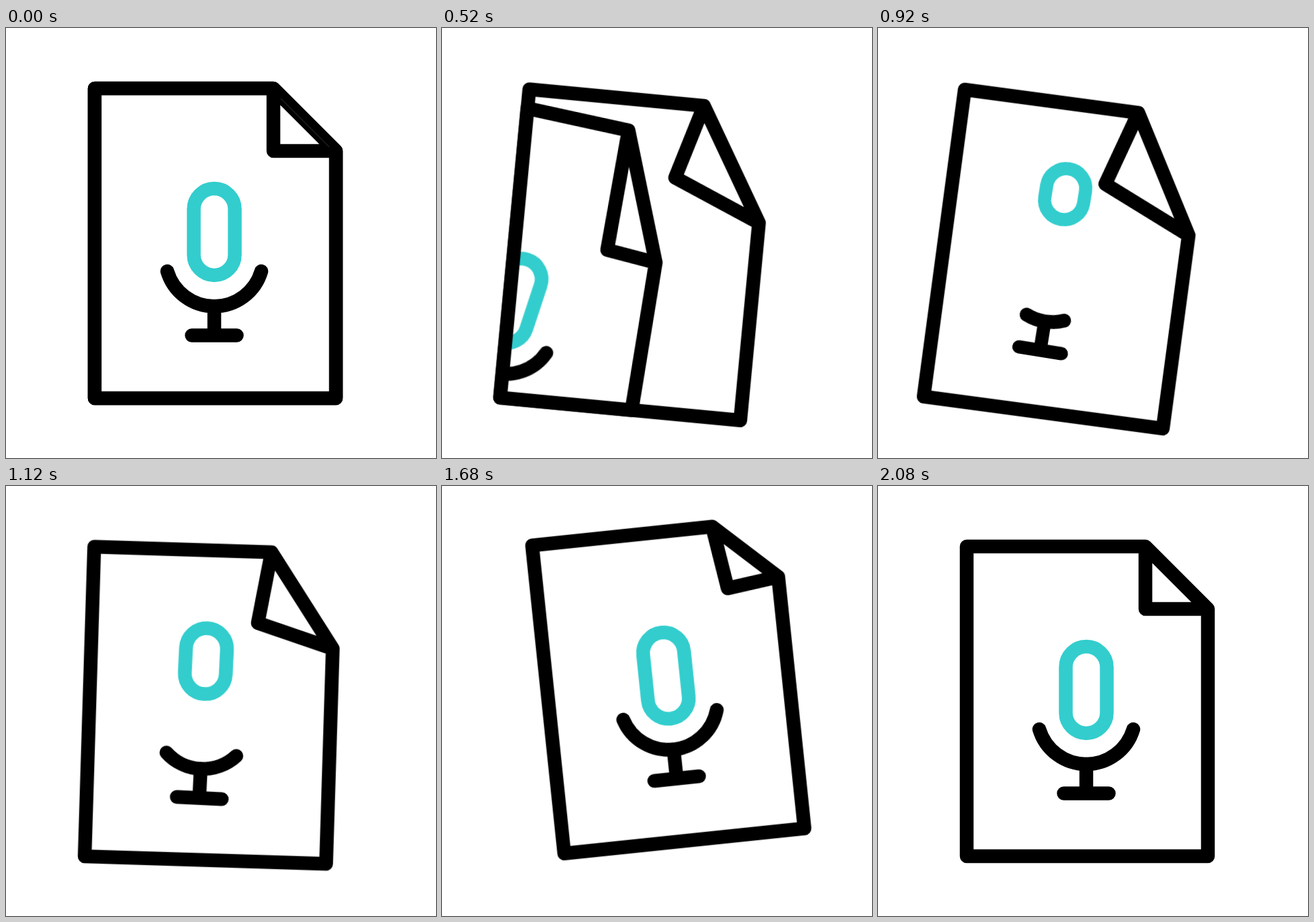
Animation of 640 by 640 pixels, one loop 2200 ms. Source, as an HTML page without scripts:

```html
<!DOCTYPE html>
<html lang="en">
<head>
<meta charset="utf-8">
<title>Audio file</title>
<style>
html, body { margin: 0; width: 100%; height: 100%; overflow: hidden; background: #fff; }
svg { display: block; width: 100vw; height: 100vh; }
svg * { animation-duration: 2.2s; animation-iteration-count: infinite; animation-timing-function: linear; }

.ink { fill: none; stroke: #000; stroke-width: 20.5; stroke-linecap: round; stroke-linejoin: round; }
.paper { fill: #fff; }
.pill { fill: none; stroke: #33cdcd; stroke-width: 20.5; }
.glint { stroke: #333; stroke-width: 1; animation-name: glint; }

.swing { transform-origin: 118px 69px; animation-name: swing; }
.back { animation-name: bend; }
.turn { animation-name: turn; }
.leaf { animation-name: leaf; }
.slide { transform-origin: 310px 303px; animation-name: slide; }
.next { animation-name: next; }
.sway { transform-origin: 310px 415px; animation-name: sway; }
.next .pill { transform-box: fill-box; transform-origin: center; animation-name: stretch, pop; }
.next .stand { transform-origin: 310px 457px; animation-name: pop; }
.next .arc { stroke-dasharray: 1 2; animation-name: draw; }

@keyframes swing {
  0%, 4.5% { transform: rotate(0deg); animation-timing-function: cubic-bezier(.5,0,.8,.5); }
  16.36% { transform: rotate(.5deg); animation-timing-function: cubic-bezier(.4,.08,.5,.95); }
  29.09% { transform: rotate(7.6deg); }
  30.91% { transform: rotate(7.75deg); }
  36.36% { transform: rotate(8.1deg); animation-timing-function: cubic-bezier(.5,0,.85,.34); }
  50.91% { transform: rotate(1.86deg); }
  54.55% { transform: rotate(-5.3deg); animation-timing-function: cubic-bezier(.25,.67,.6,1); }
  60% { transform: rotate(-9.1deg); }
  61.82% { transform: rotate(-8.73deg); animation-timing-function: cubic-bezier(.3,.15,.8,.45); }
  76.36% { transform: rotate(-6deg); }
  80% { transform: rotate(-2.8deg); animation-timing-function: cubic-bezier(.15,.65,.4,1); }
  94.55%, 100% { transform: rotate(0deg); }
}
@keyframes bend {
  0%, 4.5% { d: path("M132 90L398 90 491 183 491 551 132 551ZM491 183L398 183 398 90"); animation-timing-function: ease-in; }
  16.36% { d: path("M132 90L395.5 90 491 229 491 551 132 551ZM491 229L377 195 395.5 90"); animation-timing-function: ease-out; }
  30.91%, 36.36% { d: path("M132 90L392 90 491 268 491 551 132 551ZM491 268L353 203 392 90"); animation-timing-function: ease-in; }
  50.91% { d: path("M132 90L396 90 491.5 231 491.5 551 132 551ZM491.5 231L378.6 196 396 90"); animation-timing-function: ease-out; }
  61.82% { d: path("M132 90L403 90 491.5 172.7 491.5 551 132 551ZM491.5 172.7L422 184 403 90"); animation-timing-function: ease-in; }
  76.36% { d: path("M132 90L401.5 90 491.5 174.5 491.5 551 132 551ZM491.5 174.5L415 183.8 401.5 90"); animation-timing-function: ease-out; }
  94.55%, 100% { d: path("M132 90L398 90 491 183 491 551 132 551ZM491 183L398 183 398 90"); }
}

/* front sheet folding away to the left */
@keyframes turn {
  0%, 32.72% { visibility: visible; }
  32.73%, 100% { visibility: hidden; }
}
@keyframes leaf {
  0%, 4.5% { d: path("M132 90L398 90 491 183 491 551 132 551ZM491 183L398 183 398 90"); animation-timing-function: cubic-bezier(.33,0,.67,.21); }
  16.36% { d: path("M132 106L368 123 448 247 427.5 551 132 551ZM448 247L350 235 368 123"); animation-timing-function: cubic-bezier(.33,.16,.67,.48); }
  30.91% { d: path("M132 140L142 161 164.5 470 159 551 132 551ZM164.5 470L132.5 458 142 161"); }
  32.73%, 100% { d: path("M132 160L132 170 132 500 132 551 132 551ZM132 500L132 480 132 170"); }
}
@keyframes slide {
  0%, 4.5% { transform: translate(0px, 0px) rotate(0deg); animation-timing-function: cubic-bezier(.33,0,.67,.21); }
  16.36% { transform: translate(-55px, 45px) rotate(4deg); animation-timing-function: cubic-bezier(.33,.16,.67,.48); }
  30.91%, 100% { transform: translate(-370px, 200px) rotate(28deg); }
}
@keyframes glint {
  0%, 5.44% { opacity: 1; }
  5.45%, 100% { opacity: 0; }
}

/* microphone growing on the next sheet */
@keyframes next {
  0%, 32.72% { visibility: hidden; }
  32.73%, 100% { visibility: visible; }
}
@keyframes sway {
  0%, 32.73% { transform: translate(-19px, 3px) rotate(2deg); }
  50.91% { transform: translate(-9.5px, 1.5px) rotate(1deg); }
  60%, 100% { transform: translate(0px, 0px) rotate(0deg); }
}
@keyframes pop {
  0%, 32.73% { transform: scale(0); animation-timing-function: ease-out; }
  43.64%, 100% { transform: scale(1); }
}
@keyframes stretch {
  0%, 32.73% { y: 160px; height: 61px; }
  50.91% { y: 204.5px; height: 98px; }
  61.82% { y: 213.6px; height: 106px; animation-timing-function: ease-in-out; }
  74.5%, 100% { y: 239px; height: 129px; }
}
@keyframes draw {
  0%, 32.73% { stroke-dashoffset: 1; }
  50.91% { stroke-dashoffset: .38; }
  61.82% { stroke-dashoffset: .286; animation-timing-function: ease-in-out; }
  74.5%, 100% { stroke-dashoffset: 0; }
}
</style>
</head>
<body>
<svg viewBox="0 0 640 640">
  <defs>
    <clipPath id="sheet">
      <path class="leaf" d="M132 90L398 90 491 183 491 551 132 551ZM491 183L398 183 398 90"/>
    </clipPath>
  </defs>
  <g class="swing">
    <path class="ink paper back" d="M132 90L398 90 491 183 491 551 132 551ZM491 183L398 183 398 90"/>

    <g class="next">
      <g class="sway">
        <rect class="pill" x="279.5" y="239" width="61" height="129" rx="30.5"/>
        <path class="ink arc" pathLength="1" d="M310 414A73 73 0 0 1 240 362"/>
        <path class="ink arc" pathLength="1" d="M310 414A73 73 0 0 0 380 362"/>
        <path class="ink stand" d="M310 414V457.5M276.5 457.5H343.5"/>
      </g>
    </g>

    <g class="turn">
      <path class="paper leaf" d="M132 90L398 90 491 183 491 551 132 551ZM491 183L398 183 398 90"/>
      <g clip-path="url(#sheet)">
        <g class="slide">
          <rect class="pill" x="279.5" y="239" width="61" height="129" rx="30.5"/>
          <path class="ink" d="M240 362A73 73 0 0 0 380 362M310 414V457.5M276.5 457.5H343.5"/>
        </g>
      </g>
      <path class="ink leaf" d="M132 90L398 90 491 183 491 551 132 551ZM491 183L398 183 398 90"/>
      <path class="glint" d="M409 105L481 177"/>
    </g>
  </g>
</svg>
</body>
</html>
```
